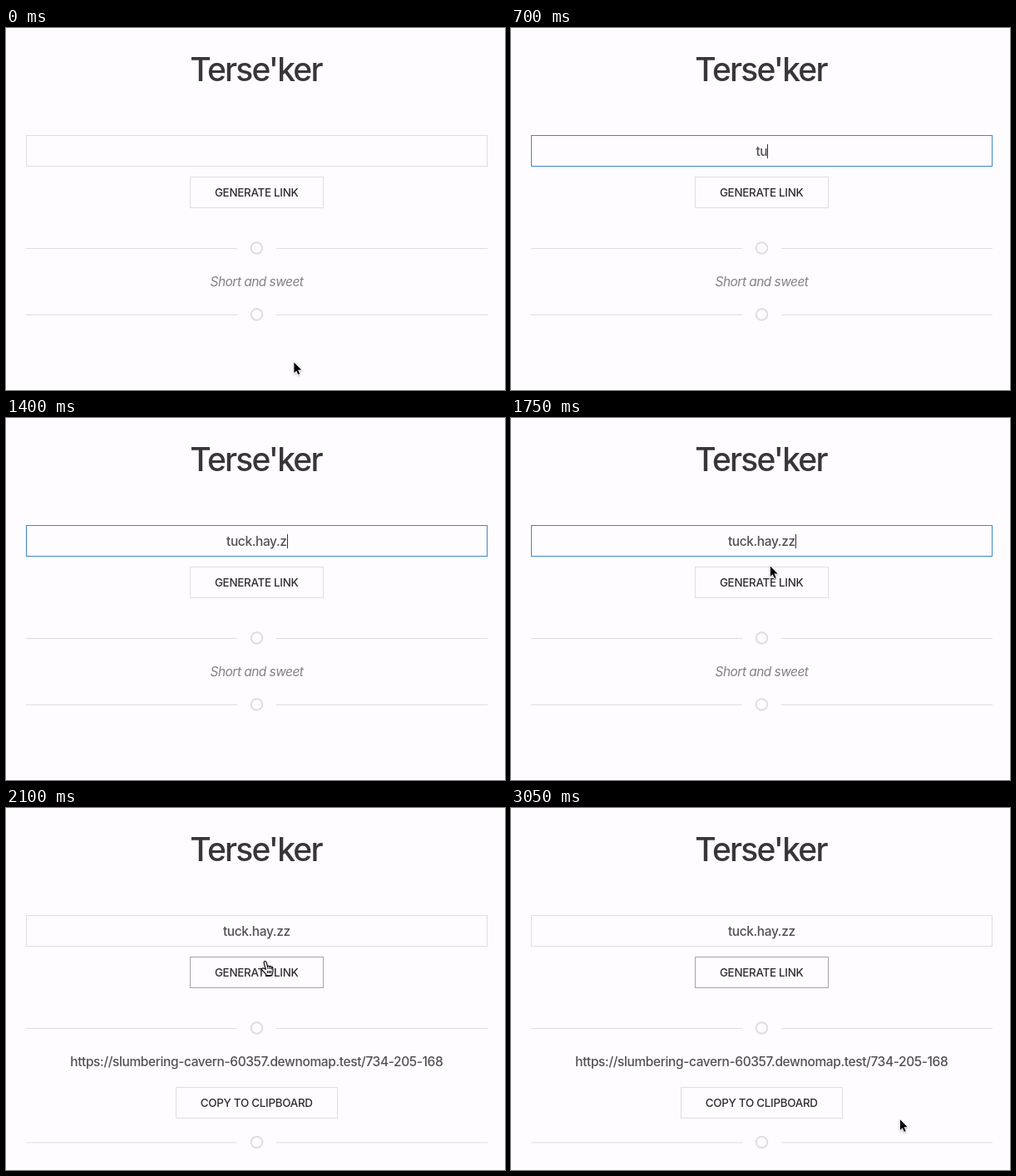
An HTML page for the animation above (3100 ms loop, 600 px wide and 436 px high).

```html
<!DOCTYPE html>
<html lang="en">
<head>
<meta charset="utf-8">
<title>Link shortener</title>
<style>
  html, body { margin: 0; width: 100%; height: 100%; overflow: hidden; background: #fefcff; }
  svg { display: block; width: 600px; height: 436px; }
  text {
    font: 450 15.5px Inter, "Liberation Sans", sans-serif;
    font-optical-sizing: none;
    letter-spacing: -.025em;
    text-anchor: middle;
    fill: #525056;
  }
  .title { font-size: 39px; font-weight: 500; letter-spacing: -.047em; fill: #38363b; }
  .label { font-size: 13.4px; letter-spacing: -.021em; fill: #2e2c31; }
  .tagline { font-style: italic; letter-spacing: -.035em; fill: #838187; }
  .box, .rule { fill: none; stroke: #dfdde3; }
  #caret { stroke: #333; }
  #ring { fill: none; stroke: #000; stroke-width: 3; }
  #mouse { filter: drop-shadow(0 1px 1px #0004); }
</style>
</head>
<body>
<svg viewBox="0 0 600 436">
  <defs>
    <g id="rule">
      <path d="M24 .5H278M325 .5H579"/>
      <circle cx="301.5" r="6.8" stroke-width="2"/>
    </g>
  </defs>

  <text class="title" x="300.5" y="63.5">Terse'ker</text>

  <rect id="field" class="box" x="24.5" y="129.5" width="554" height="37"/>
  <text id="typed" x="301.3" y="154"></text>
  <path id="caret" d="M.5 140V157"/>

  <rect id="button" class="box" x="221.5" y="179.5" width="160" height="37"/>
  <text class="label" x="301.2" y="203">GENERATE LINK</text>

  <use class="rule" href="#rule" y="265"/>

  <g id="before">
    <text class="tagline" x="301.5" y="311">Short and sweet</text>
    <use class="rule" href="#rule" y="345"/>
  </g>

  <g id="after">
    <text x="301.3" y="311">https://slumbering-cavern-60357.dewnomap.test/734-205-168</text>
    <rect class="box" x="204.5" y="336.5" width="194" height="37"/>
    <text class="label" x="301.2" y="360">COPY TO CLIPBOARD</text>
    <use class="rule" href="#rule" y="402.5"/>
  </g>

  <circle id="ring"/>

  <g id="mouse">
    <path id="arrow" d="M.4 .8V13.4L3.2 10.7 5.3 15.4 7.2 14.6 5.1 9.8H9.2Z"
          stroke="#fff" stroke-width="1.6" paint-order="stroke"/>
    <g id="beam" fill="none">
      <path stroke="#fff" stroke-width="2.6"
            d="M-3.2-7C-1-7 0-6.5 0-5V5C0 6.5-1 7-3.2 7M3.2-7C1-7 0-6.5 0-5M3.2 7C1 7 0 6.5 0 5M-1.6 1H1.6"/>
      <path stroke="#000" stroke-width="1.2"
            d="M-3.2-7C-1-7 0-6.5 0-5V5C0 6.5-1 7-3.2 7M3.2-7C1-7 0-6.5 0-5M3.2 7C1 7 0 6.5 0 5M-1.6 1H1.6"/>
    </g>
    <g id="hand" fill="#fff" stroke="#000" stroke-width="1.1" stroke-linejoin="round">
      <path d="M-.6 9.4-2.8 1.6C-3.2-.6-.8-1.2 0 .8L1.6 6C1.6 4.8 3.8 4.6 4.1 6.1 4.4 5.1 6.1 5.3 6.3 6.8 6.7 6.1 7.8 6.5 7.9 8L8 11C8 13.2 6.9 14 6.7 16.6H.2C-.4 14-3 12.6-5.4 9.6-6.2 7.8-4.2 7-.6 9.4Z"/>
      <path fill="none" d="M1.6 6 2.2 9M4.1 6.1 4.5 9M6.3 6.8 6.5 9.4M1.6 11V14M3.6 11V14M5.5 11V14"/>
    </g>
  </g>
</svg>

<script>
const LOOP = 3100, STEP = 50;
const CLICKS = [200, 1850];
const RESULT = 2100;
const WORD = "tuck.hay.zz";
const KEYS = [600, 700, 800, 850, 950, 1050, 1150, 1250, 1300, 1400, 1500];
const RADII = [18, 28, 36];

// start, end, from x, y, to x, y
const MOVES = [
  [0, 200, 346, 402, 303, 138],
  [1600, 1800, 303, 138, 313, 185],
  [2800, 3050, 313, 185, 467.5, 374.5]
];
const IDLE = [223, 221, 227], FOCUS = [63, 135, 198];
// time, grey level of the button border
const SHADES = [[1750, 223], [1850, 178], [1900, 138], [2000, 138], [2100, 164]];

const el = {};
document.querySelectorAll("[id]").forEach(e => el[e.id] = e);

const clamp = x => Math.min(1, Math.max(0, x));
const smooth = x => x * x * (3 - 2 * x);
const easeOut = x => 1 - (1 - x) ** 2;
const lerp = (a, b, k) => a + (b - a) * k;
const show = (e, on) => { e.style.display = on ? "" : "none"; };
const rgb = c => `rgb(${c.map(Math.round)})`;
const inside = (x, y, l, t, r, b) => x >= l && x <= r && y >= t && y <= b;

function pointer(t) {
  const [a, b, x0, y0, x1, y1] = MOVES.filter(m => t >= m[0]).pop();
  const k = smooth(clamp((t - a) / (b - a)));
  return [lerp(x0, x1, k), lerp(y0, y1, k)];
}

function shade(t) {
  const i = SHADES.findIndex(s => s[0] > t);
  if (i < 0) return SHADES[SHADES.length - 1][1];
  if (i === 0) return SHADES[0][1];
  const [a, u] = SHADES[i - 1], [b, v] = SHADES[i];
  return lerp(u, v, (t - a) / (b - a));
}

function drawField(t) {
  const [on, off] = CLICKS.map(c => easeOut(clamp((t - c) / 200)));
  el.field.style.stroke = rgb(IDLE.map((c, i) => lerp(c, FOCUS[i], on - off)));
  el.typed.textContent = WORD.slice(0, KEYS.filter(k => t >= k).length);
  const x = Math.round(301.3 + el.typed.getComputedTextLength() / 2);
  el.caret.setAttribute("transform", `translate(${x})`);
  show(el.caret, t >= 300 && t < CLICKS[1]);
}

function drawMouse(t) {
  const [x, y] = pointer(t);
  const kind = inside(x, y, 24, 129, 579, 167) ? "beam"
    : inside(x, y, 221, 179, 382, 217) ? "hand" : "arrow";
  for (const k of ["arrow", "beam", "hand"]) show(el[k], k === kind);
  show(el.mouse, t < 550 || t >= 1650);
  el.mouse.setAttribute("transform", `translate(${x} ${y})`);

  const click = CLICKS.find(c => t >= c && t < c + RADII.length * STEP);
  show(el.ring, click !== undefined);
  if (click !== undefined) {
    el.ring.setAttribute("r", RADII[(t - click) / STEP]);
    el.ring.setAttribute("cx", x - 1);
    el.ring.setAttribute("cy", y);
  }
}

function render(t) {
  drawField(t);
  el.button.style.stroke = rgb(Array(3).fill(shade(t)));
  show(el.before, t < RESULT);
  show(el.after, t >= RESULT);
  drawMouse(t);
}

const start = performance.now();
function tick() {
  const t = (performance.now() - start) % LOOP;
  render(Math.floor(t / STEP) * STEP);
  requestAnimationFrame(tick);
}
tick();
</script>
</body>
</html>
```
